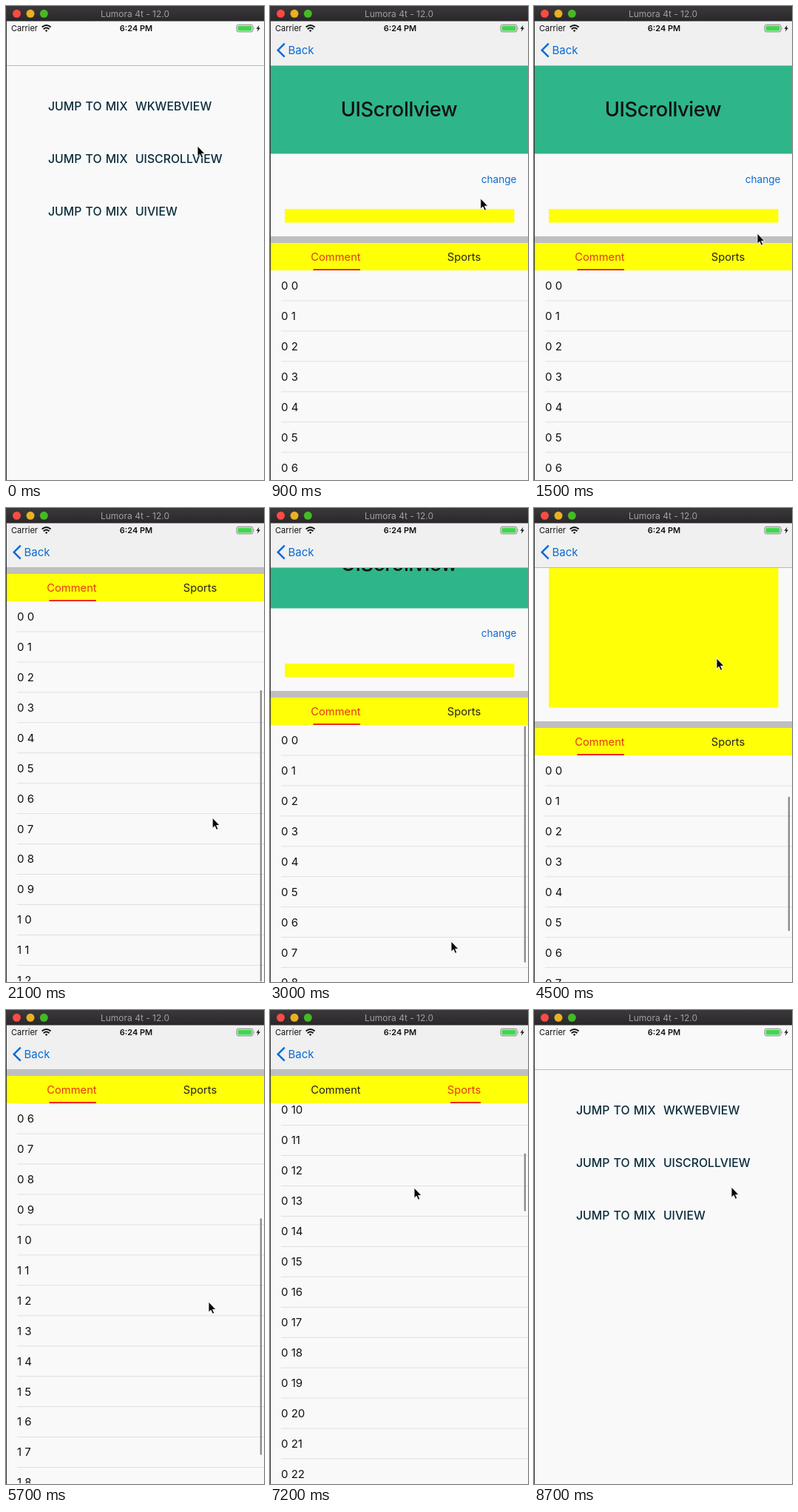
These frames come from a looping animation (349x640 px, 9000 ms). An HTML page:

```html
<!DOCTYPE html>
<html lang="en">
<head>
<meta charset="utf-8">
<title>Nested scrolling demo</title>
<style>
  html, body { margin: 0; width: 100%; height: 100%; overflow: hidden; background: #f9f9f9; }
  svg { display: block; }
  text { font-family: Inter, "Open Sans", sans-serif; fill: #111; white-space: pre; }
  .menu text { font-size: 15.8px; font-weight: 500; word-spacing: 1px; fill: #0b2c3c; }
  .status { font-size: 11px; }
  .tab { font-size: 14.7px; fill: #222; }
  .tab.active { fill: #e23a12; }
  .row { font-size: 15px; }
  .link { fill: #0b6bd6; }
  .bar { fill: #8c8c8c; }
</style>
</head>
<body>
<svg id="stage" width="349" height="640" viewBox="0 0 349 640">
  <defs>
    <linearGradient id="chrome" x2="0" y2="1">
      <stop stop-color="#3b393b"/><stop offset="1" stop-color="#292729"/>
    </linearGradient>
  </defs>
  <rect width="349" height="640" fill="#f9f9f9"/>

  <g id="home" class="menu">
    <text x="57" y="141">JUMP TO MIX  WKWEBVIEW</text>
    <text x="57" y="212">JUMP TO MIX  UISCROLLVIEW</text>
    <text x="57" y="282.7">JUMP TO MIX  UIVIEW</text>
  </g>

  <g id="detail">
    <!-- Outer scroll view -->
    <svg y="81" width="349" height="559" overflow="hidden">
      <g id="content">
        <rect y="-1" width="349" height="119.5" fill="#2eb58a"/>
        <text x="174.5" y="68" text-anchor="middle" font-size="27.3" font-weight="500" letter-spacing="-.4">UIScrollview</text>
        <text class="link" x="333.5" y="157.5" text-anchor="end" font-size="13.6">change</text>
        <rect id="box" x="20" y="193" width="310.5" fill="#ffff08"/>
        <g id="lower">
          <rect y="230" width="349" height="9" fill="#bfbfbf"/>
          <rect y="239" width="349" height="37" fill="#ffff08"/>
          <text id="tab0" x="89" y="263.2" text-anchor="middle">Comment</text>
          <text id="tab1" x="262.5" y="263.2" text-anchor="middle">Sports</text>
          <rect id="underline" y="274" height="2" fill="#f02a12"/>
          <!-- Inner tables -->
          <svg y="276" width="349" height="513" overflow="hidden">
            <g id="table0"></g>
            <g id="table1"></g>
            <rect id="innerBar" class="bar" x="343.7" width="2.4" rx="1.2"/>
          </svg>
        </g>
      </g>
      <rect id="outerBar" class="bar" x="343.7" width="2.4" rx="1.2"/>
    </svg>
    <rect y="20" width="349" height="61" fill="#f0f0f0"/>
    <path d="M19.7 50.7 10.7 59.7l9 9" fill="none" stroke="#0b6bd6" stroke-width="2.5"/>
    <text class="link" x="24.5" y="65" font-size="15">Back</text>
  </g>

  <!-- Window and status bar -->
  <rect y="80" width="349" height="1" fill="#b9b9b9"/>
  <rect width="349" height="20.5" fill="url(#chrome)"/>
  <rect width="1" height="640" fill="#383838"/>
  <circle cx="14.5" cy="10.3" r="5.5" fill="#fb4b45"/>
  <circle cx="33" cy="10.3" r="5.5" fill="#e9b122"/>
  <circle cx="51.3" cy="10.3" r="5.5" fill="#45ba25"/>
  <text x="174.5" y="14.7" text-anchor="middle" font-size="12" style="fill:#a19fa1">Lumora 4t - 12.0</text>
  <text class="status" x="7" y="34">Carrier</text>
  <g fill="none" stroke="#111" stroke-width="1.9">
    <path d="M48.6 28.6q6-5 12 0M50.7 31.2q3.9-3.2 7.8 0"/>
    <path d="M54.6 34.9l-1.8-2q1.8-1.4 3.6 0z" fill="#111" stroke="none"/>
  </g>
  <text class="status" x="176" y="34" text-anchor="middle" font-weight="600">6:24 PM</text>
  <rect x="312" y="25.3" width="22" height="9.6" rx="2.4" fill="none" stroke="#777" stroke-width=".9"/>
  <rect x="313.5" y="26.8" width="19" height="6.6" rx="1.2" fill="#43d551"/>
  <path d="M335.3 28.5q1.7 1.6 0 3.3z" fill="#777"/>
  <path d="M342.6 25.8l-4.1 5h2.5l-1.3 4 4.3-5.2h-2.6z" fill="#111"/>

  <path id="cursor" d="M0 0V14.2L3.2 11.3 5.4 16.3 7.8 15.2 5.6 10.4H10z" fill="#080808" stroke="#fff" stroke-width=".9"/>
</svg>

<script>
const LOOP = 9000, STEP = 300;
const ROW = 44 * 349 / 375;
const VIEW = 559, TABLE = 513;
const PIN = 231;      // scroll distance until the tabs stick
const GROWTH = 913;   // extra box height after "change"
const COMMENT_END = 307, SPORTS_END = 842;
const el = id => document.getElementById(id);

// Places the pointer rests at or passes: time, x, y.
const pointerPath = [
  [0, 259, 189], [1500, 302, 307], [3000, 245, 585], [3600, 309, 231], [4500, 247, 203],
  [5700, 274, 394], [6300, 264, 107], [7200, 195, 240], [8100, 39, 58], [8700, 267, 239]
];

const ramp = (t, from, to) => Math.min(1, Math.max(0, (t - from) / (to - from)));
const between = (t, from, to) => t >= from && t <= to;
const show = (id, on) => el(id).setAttribute('display', on ? 'inline' : 'none');
const move = (id, x, y) => el(id).setAttribute('transform', `translate(${x} ${y})`);

function pointerAt(t) {
  const i = pointerPath.findLastIndex(point => point[0] <= t);
  const [from, x, y] = pointerPath[i];
  const [to, nextX, nextY] = pointerPath[i + 1] || [LOOP, x, y];
  const k = ramp(t, from, to);
  return [x + (nextX - x) * k, y + (nextY - y) * k];
}

// Up to the tabs, back down, then up again past the grown box.
function outerOffset(t) {
  const firstPass = ramp(t, 1500, 2100) - ramp(t, 2400, 3230);
  return PIN * firstPass + (PIN + GROWTH) * ramp(t, 3600, 4700);
}

function addRows(id, count, perSection) {
  let markup = '';
  for (let i = 0; i < count; i++) {
    const y = i * ROW;
    const label = `${Math.floor(i / perSection)} ${i % perSection}`;
    markup += `<text class="row" x="15" y="${y + 25.9}">${label}</text>` +
      `<rect x="15" y="${y + 40.6}" width="334" height=".8" fill="#d9d9d9"/>`;
  }
  el(id).innerHTML = markup;
}

function placeBar(id, offset, viewport, content) {
  el(id).setAttribute('y', 1.5 + offset / content * viewport);
  el(id).setAttribute('height', viewport * viewport / content - 2);
}

function selectTab(sports) {
  show('table0', !sports);
  show('table1', sports);
  el('tab0').setAttribute('class', sports ? 'tab' : 'tab active');
  el('tab1').setAttribute('class', sports ? 'tab active' : 'tab');
  el('underline').setAttribute('x', sports ? 244 : 58.5);
  el('underline').setAttribute('width', sports ? 41 : 63.5);
}

function render(t) {
  const onDetail = between(t, 600, 8100);
  const sports = t >= 6600;
  const growth = t >= 3900 ? GROWTH : 0;
  const outer = outerOffset(t);
  const inner = sports
    ? SPORTS_END * ramp(t, 6600, 7800)
    : COMMENT_END * ramp(t, 4800, 5925);

  show('home', !onDetail);
  show('detail', onDetail);
  selectTab(sports);
  move('content', 0, -outer);
  move('lower', 0, growth);
  move(sports ? 'table1' : 'table0', 0, -inner);
  el('box').setAttribute('height', 18.5 + growth);

  placeBar('innerBar', inner, TABLE, ROW * (sports ? 80 : 20));
  placeBar('outerBar', outer, VIEW, VIEW + PIN + growth);
  show('innerBar', inner > 0 || between(t, 2400, 3000));
  show('outerBar', between(t, 1800, 2100) || between(t, 3900, 4800));
  move('cursor', ...pointerAt(t));
}

addRows('table0', 20, 10);
addRows('table1', 80, 80);

const start = performance.now();
function tick() {
  const t = (performance.now() - start) % LOOP;
  render(Math.floor(t / STEP) * STEP);
  requestAnimationFrame(tick);
}
tick();
</script>
</body>
</html>
```
